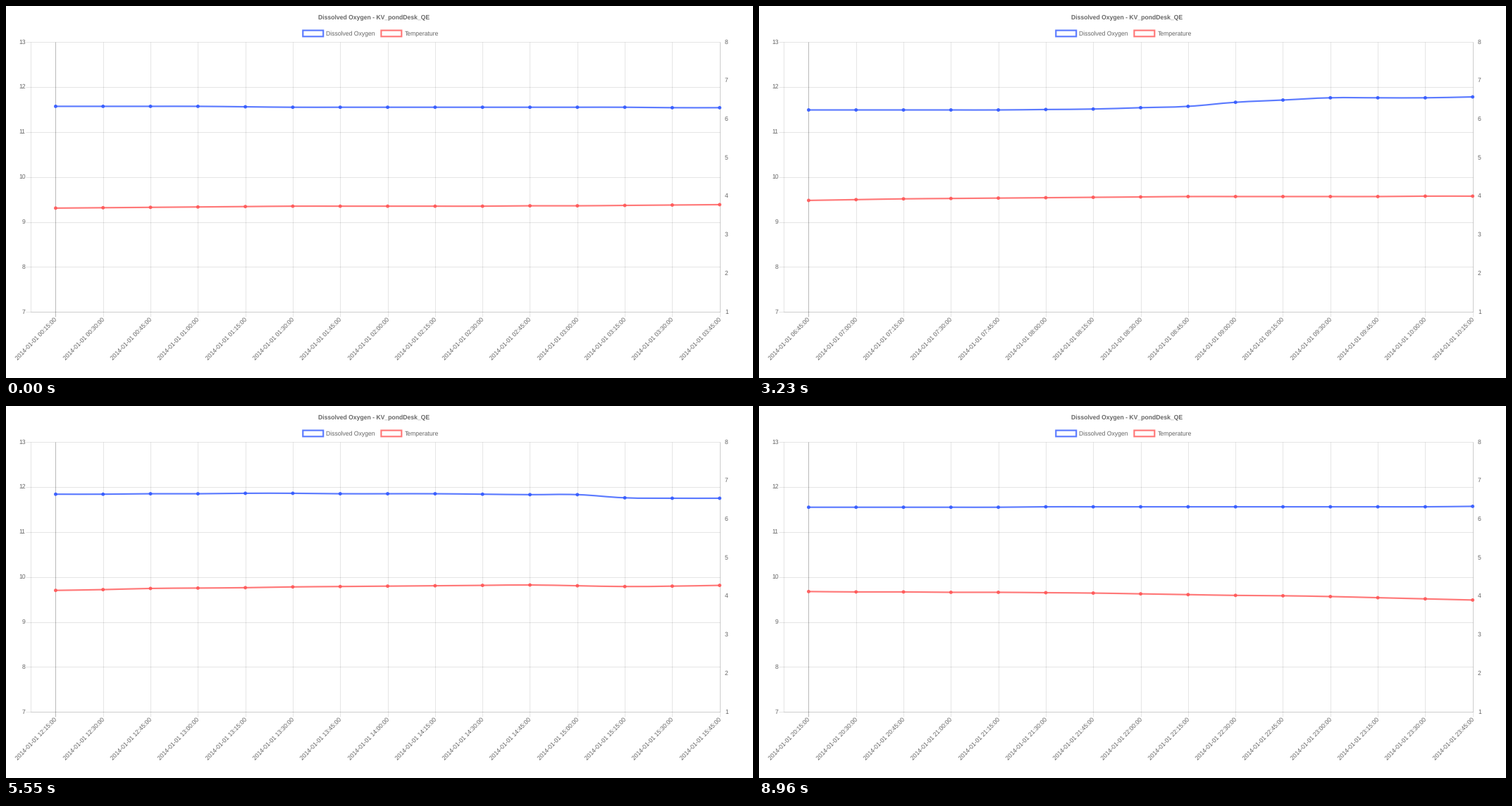
A matplotlib script for the animation above (9110 ms loop, 1060 by 528 pixels).

```python
import numpy as np
import matplotlib.pyplot as plt
from matplotlib.animation import FuncAnimation
from matplotlib.patches import PathPatch, Rectangle
from matplotlib.path import Path

W, H, DPI = 1060, 528, 100
LOOP, FRAMES = 9110, 455
INTERVAL = LOOP / FRAMES
PX = 72 / DPI                      # points per pixel
FONT = 8.63                        # text size in pixels
LEFT, RIGHT, TOP, BOTTOM = 35.2, 1013.0, 50.5, 433.5
WINDOW, STEPS = 15, 80
FIRST_STEP, STEP_TIME = 450, 107.6  # scrolling rhythm in ms
XS = np.linspace(70.4, 1012.7, WINDOW)
BLUE, RED = "#335aff", "#ff5757"
GREY = "#666666"

plt.rcParams.update({"font.family": "Liberation Sans", "text.hinting": "none"})

# Turning points of the readings as (quarter hour, value)
OXYGEN = [(0, 11.56), (3, 11.56), (5, 11.54), (12, 11.54), (18, 11.50),
          (29, 11.475), (32, 11.50), (34, 11.56), (35, 11.65), (37, 11.75),
          (39, 11.75), (44, 11.86), (45, 11.91), (46, 11.85), (48, 11.83),
          (53, 11.85), (59, 11.82), (60, 11.75), (63, 11.73), (67, 11.56),
          (69, 11.53), (74, 11.52), (80, 11.54), (94, 11.555)]
TEMPERATURE = [(0, 3.68), (5, 3.73), (10, 3.735), (18, 3.81), (20, 3.845),
               (24, 3.85), (28, 3.915), (34, 3.98), (43, 3.99), (45, 4.083),
               (47, 4.11), (50, 4.19), (53, 4.227), (58, 4.28), (60, 4.24),
               (63, 4.28), (69, 4.19), (78, 4.15), (80, 4.11), (85, 4.083),
               (91, 3.98), (94, 3.89)]


def series(knots, low, high):
    """Pixel heights of all readings, to two decimals, on a low-high axis."""
    index, value = zip(*knots)
    values = np.interp(np.arange(STEPS + WINDOW), index, value).round(2)
    return BOTTOM - (values - low) / (high - low) * (BOTTOM - TOP)


def smooth_path(points):
    """Cubic curve through the points with tension 0.4."""
    tangent = 0.4 * np.gradient(points, axis=0)
    verts = [points[0]]
    for i in range(len(points) - 1):
        verts += [points[i] + tangent[i], points[i + 1] - tangent[i + 1],
                  points[i + 1]]
    return Path(verts, [Path.MOVETO] + [Path.CURVE4] * (len(verts) - 1))


def dots_path(points):
    return Path.make_compound_path(*[Path.circle(p, 2.45) for p in points])


fig = plt.figure(figsize=(W / DPI, H / DPI), dpi=DPI, facecolor="white")
ax = fig.add_axes([0, 0, 1, 1])
ax.set_xlim(0, W)
ax.set_ylim(H, 0)
ax.axis("off")


def rule(x0, y0, x1, y1, alpha=0.1):
    """Hairline; the offset makes rows snap downwards."""
    ax.plot([x0, x1], [y0 + 0.75, y1 + 0.75], color="black", alpha=alpha,
            lw=PX, solid_capstyle="butt", zorder=1)


def label(x, y, text, **style):
    """Text whose capitals are centred on y."""
    return ax.text(x, y + 0.358 * FONT, text, fontsize=FONT * PX, color=GREY,
                   va="baseline", **style)


for i, x in enumerate(XS):
    rule(x, TOP, x, BOTTOM + 7.2, 0.27 if i == 0 else 0.1)
for i, y in enumerate(np.linspace(TOP, BOTTOM, 7)):
    rule(LEFT - 7.2, y, RIGHT, y)
    label(27.8, y, str(13 - i), ha="right")
for i, y in enumerate(np.linspace(TOP, BOTTOM, 8)):
    label(1020, y, str(8 - i), ha="left")
rule(LEFT, TOP, LEFT, BOTTOM)
rule(RIGHT, TOP, RIGHT, BOTTOM)
rule(LEFT, BOTTOM, RIGHT, BOTTOM)

label(521.7, 15.6, "Dissolved Oxygen - KV_pondDesk_QE", ha="center",
      weight="bold")
for x, name, color in [(421.3, "Dissolved Oxygen", BLUE),
                       (532.4, "Temperature", RED)]:
    ax.add_patch(Rectangle((x, 34.6), 28.9, 8.7, fill=False, edgecolor=color,
                           alpha=0.8, lw=2.17 * PX, snap=False))
    label(x + 33, 39.2, name, ha="left")

ANGLE = 46
SHIFT = 0.358 * FONT * np.array([np.sin(np.radians(ANGLE)),
                                 np.cos(np.radians(ANGLE))])
stamps = [ax.text(x + 0.3 + SHIFT[0], 442.9 + SHIFT[1], "", fontsize=FONT * PX,
                  color=GREY, rotation=ANGLE, rotation_mode="anchor",
                  ha="right", va="baseline") for x in XS]

curves = []
for heights, color in [(series(TEMPERATURE, 1, 8), RED),
                       (series(OXYGEN, 7, 13), BLUE)]:
    points = np.column_stack([XS, heights[:WINDOW]])
    line = PathPatch(smooth_path(points), fill=False, edgecolor=color,
                     alpha=0.8, lw=2.17 * PX, capstyle="butt", zorder=3)
    dots = PathPatch(dots_path(points), facecolor=color, edgecolor="none",
                     alpha=0.9, zorder=4)
    for patch in (line, dots):
        patch.set_snap(False)
        ax.add_patch(patch)
    curves.append((heights, line, dots))


def update(frame):
    elapsed = (frame + 1) * INTERVAL - FIRST_STEP
    start = int(np.clip(elapsed // STEP_TIME + 1, 0, STEPS))
    for heights, line, dots in curves:
        points = np.column_stack([XS, heights[start:start + WINDOW]])
        line.set_path(smooth_path(points))
        dots.set_path(dots_path(points))
    for i, stamp in enumerate(stamps):
        hour, quarter = divmod(start + i + 1, 4)
        stamp.set_text(f"2014-01-01 {hour:02d}:{15 * quarter:02d}:00")
    return []


anim = FuncAnimation(fig, update, frames=FRAMES, interval=INTERVAL,
                     repeat=True, repeat_delay=0)
plt.show()
```
